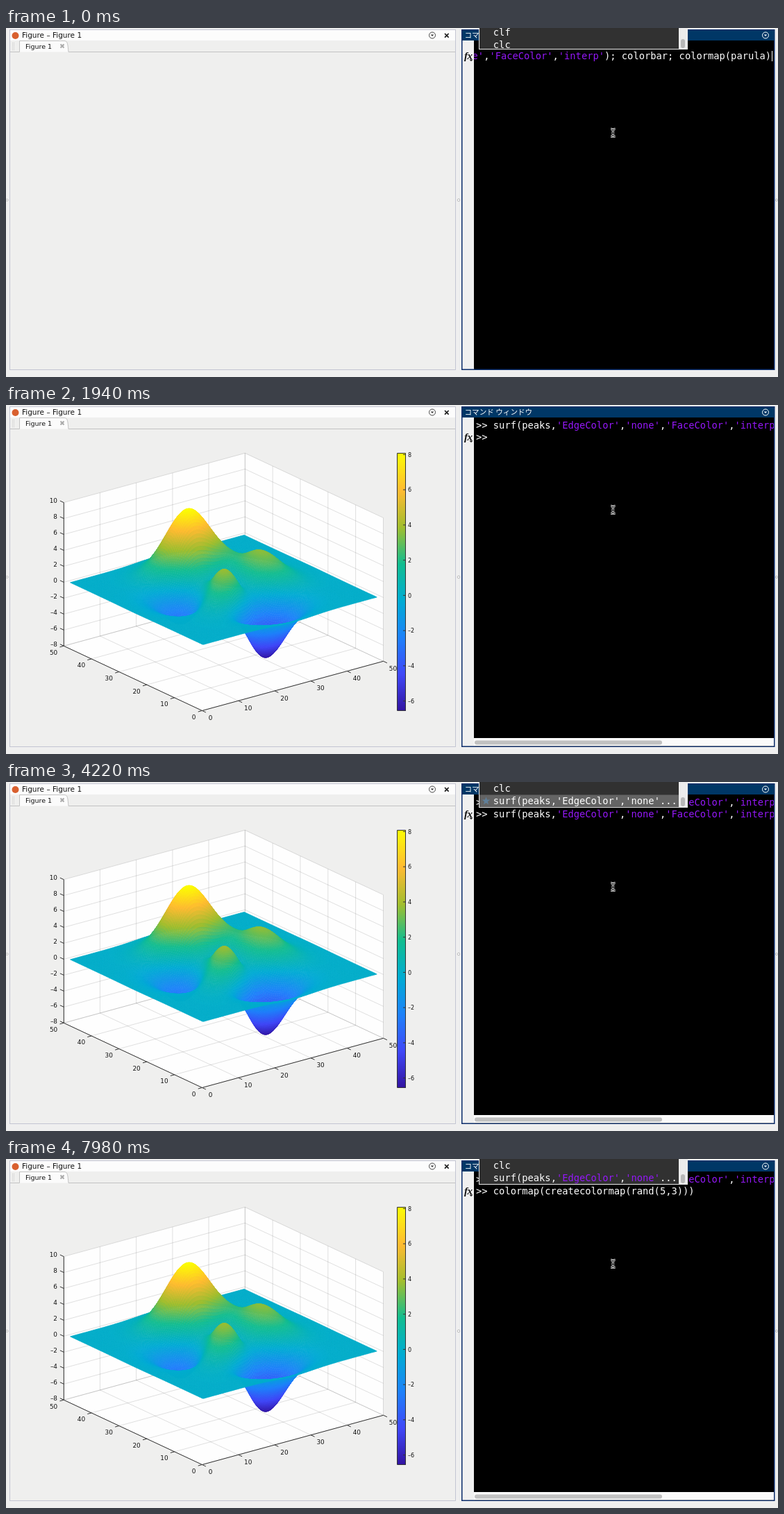
Animation, 1112 px wide and 503 px high, one loop 8000 ms. Source, as an HTML page with a canvas:

```html
<!DOCTYPE html>
<html lang="ja">
<head>
<meta charset="utf-8">
<title>Figure and command window</title>
<style>
  html, body { margin: 0; width: 100%; height: 100%; overflow: hidden; background: #efefef; }
  svg, canvas { position: absolute; left: 0; top: 0; }
  text { white-space: pre; }
  .ui { font-family: "DejaVu Sans", "Noto Sans", sans-serif; fill: #111; }
  .jp { font: 10.6px "Noto Sans CJK JP", "Noto Sans CJK", sans-serif; fill: #fff; }
  .code { font: 13.76px "DejaVu Sans Mono", monospace; fill: #fff; }
  .str { fill: #9418f8; }
  .fx { font: italic bold 15px "Liberation Serif", "Noto Serif", serif; fill: #111; letter-spacing: -.5px; }
  .axis { stroke: #333; fill: none; }
  .grid { stroke: #262626; stroke-opacity: .14; fill: none; }
</style>
</head>
<body>
<svg id="stage" width="1112" height="503" viewBox="0 0 1112 503">
  <defs>
    <clipPath id="pane"><rect x="674" y="18" width="432" height="473"/></clipPath>
    <clipPath id="list"><rect x="682" y="0" width="287" height="36"/></clipPath>
  </defs>

  <!-- figure window -->
  <rect x="5.5" y="2.5" width="642" height="490" fill="#efefee" stroke="#c3c5d2"/>
  <rect x="6" y="3" width="641" height="15" fill="#fcfcfc"/>
  <path d="M6 34.5H19.5V18.5H84C89 18.5 89 24 90 34.5H647" fill="#fbfbfb" stroke="#c2c2c2"/>
  <path d="M9.5 21V32M11.5 21V32" stroke="#c8c8c8" stroke-dasharray="1 1"/>
  <circle cx="13.5" cy="11" r="5" fill="#d9602f"/>
  <text class="ui" x="23" y="14.4" font-size="10.5">Figure – Figure 1</text>
  <text class="ui" x="28" y="30" font-size="9.5">Figure 1</text>
  <path d="M78.5 23.5l5 5m0-5l-5 5" stroke="#aaa" stroke-width="2"/>
  <g stroke="#444" fill="none"><circle cx="614" cy="10.5" r="4.5"/><path d="M611.8 9.5h4.4l-2.2 2.6z" fill="#333" stroke="none"/></g>
  <path d="M632 8l5.6 5.6m0-5.6l-5.6 5.6" stroke="#111" stroke-width="1.6"/>
  <g fill="#fff" stroke="#bbb"><circle cx="1.5" cy="248" r="1.5"/><circle cx="652" cy="248" r="1.8"/><circle cx="1110" cy="248" r="1.5"/></g>

  <!-- command window -->
  <rect x="656" y="2" width="451.5" height="491" fill="#0b2c6b"/>
  <rect x="657" y="3" width="450" height="15" fill="#003766"/>
  <rect x="657.5" y="18" width="17" height="473.5" fill="#f0f0f0"/>
  <rect x="674" y="18" width="432" height="473.5"/>
  <text class="jp" x="660.5" y="13.6">コマンド ウィンドウ</text>
  <g stroke="#fff" fill="none"><circle cx="1094" cy="10.5" r="4.5"/><path d="M1091.8 9.5h4.4l-2.2 2.6z" fill="#fff" stroke="none"/></g>
</svg>
<canvas id="surface" width="1112" height="503"></canvas>

<script>
const LOOP = 8000, ENTER = 1280, PLOT = 1660, POPUP = 3900, CLC = 4560, CLF = 4900, RECALL = 6120;
const CHAR = 8.284, LEFT = 677, INPUT = LEFT + 3 * CHAR;
const SURF = "surf(peaks,'EdgeColor','none','FaceColor','interp'); colorbar; colormap(parula)";
const MAP = 'colormap(createcolormap(rand(5,3)))';
const stage = document.getElementById('stage');
const canvas = document.getElementById('surface');
const timed = [];

function el(tag, attrs, parent = stage, text) {
  const node = document.createElementNS('http://www.w3.org/2000/svg', tag);
  for (const k in attrs) node.setAttribute(k, attrs[k]);
  if (text !== undefined) node.textContent = text;
  return parent.appendChild(node);
}

// Shows a node only during the given [from, to) spans.
function during(node, ...spans) {
  timed.push([node, spans]);
  return node;
}

const group = (...spans) => during(el('g', {}), ...spans);
const rect = (parent, x, y, width, height, fill, rx = 0) =>
  el('rect', { x, y, width, height, fill, rx }, parent);

function code(parent, x, y, str, plain) {
  const text = el('text', { class: 'code', x, y }, parent);
  for (const part of plain ? [str] : str.split(/('[^']*')/))
    el('tspan', !plain && part[0] === "'" ? { class: 'str' } : {}, text, part);
}

function caret(x, y, start, end) {
  const spans = [];
  for (let t = start; t < end; t += 1000) spans.push([t, Math.min(t + 500, end)]);
  during(rect(stage, x, y - 12, 1, 16, '#fff'), ...spans);
}

function fx(parent, y) {
  el('text', { class: 'fx', x: 660, y }, parent, 'fx');
  el('path', { d: `M667.5 ${y + 1}h5l-2.5 2.5z`, fill: '#111' }, parent);
}

/* ---- plot ---- */
const project = (x, y, z) => [282.5 + 5.22 * x - 3.985 * y, 440.5 - 1.425 * x - 1.865 * y - 11.48 * (z + 8)];
const poly = pts => 'M' + pts.map(p => project(...p).map(v => v.toFixed(1)).join(' ')).join('L');

function axes() {
  const g = group([PLOT, LOOP]);
  const line = (cls, ...pts) => el('path', { class: cls, d: poly(pts) }, g);
  const label = (x, y, str, size, anchor = 'middle') =>
    el('text', { class: 'ui', x, y, 'font-size': size, 'text-anchor': anchor }, g, String(str).replace('-', '–'));
  const tick = (p, dx, dy) => el('path', { class: 'axis', d: `M${p}l${dx} ${dy}` }, g);

  el('path', {
    d: poly([[0, 0, -8], [50, 0, -8], [50, 0, 10], [50, 50, 10], [0, 50, 10], [0, 50, -8]]) + 'Z', fill: '#fefefe'
  }, g);
  for (let v = 0; v <= 50; v += 10) {
    line('grid', [v, 0, -8], [v, 50, -8], [v, 50, 10]);
    line('grid', [0, v, -8], [50, v, -8], [50, v, 10]);
    const px = project(v, 0, -8), py = project(0, v, -8);
    tick(px, 5.4, 2.5);
    tick(py, -5.8, 1.6);
    label(px[0] + (v ? 14 : 12), px[1] + 13.5, v, 8.9);
    label(py[0] - (v ? 14.7 : 12), py[1] + 12.3, v, 8.9);
  }
  for (let z = -8; z <= 10; z += 2) {
    line('grid', [0, 50, z], [50, 50, z], [50, 0, z]);
    const p = project(0, 50, z);
    tick(p, -5.4, -2.5);
    label(74, p[1] + .8, z, 8.9, 'end');
  }
  line('axis', [50, 0, -8], [0, 0, -8], [0, 50, -8], [0, 50, 10]);
  for (let v = -6; v <= 8; v += 2) label(579, barY(v) + 3.2, v, 8, 'start');
}

const LOW = -6.547, HIGH = 8.075;
const barY = v => 440.5 - (v - LOW) / (HIGH - LOW) * 371;
const parula = [[50, 20, 160], [64, 72, 248], [30, 130, 250], [0, 172, 211], [18, 189, 144],
  [162, 190, 46], [255, 187, 50], [252, 252, 4]];

function shade(z) {
  const t = Math.max(0, Math.min(.9999, (z - LOW) / (HIGH - LOW))) * (parula.length - 1);
  const i = Math.floor(t), f = t - i;
  return `rgb(${parula[i].map((c, k) => Math.round(c + (parula[i + 1][k] - c) * f))})`;
}

function peaks(x, y) {
  const { exp } = Math;
  return 3 * (1 - x) ** 2 * exp(-x * x - (y + 1) ** 2)
    - 10 * (x / 5 - x ** 3 - y ** 5) * exp(-x * x - y * y)
    - exp(-((x + 1) ** 2) - y * y) / 3;
}

function drawSurface() {
  const ctx = canvas.getContext('2d'), N = 144;
  const height = (i, j) => peaks(i * 6 / N - 3, j * 6 / N - 3);
  const at = (i, j) => project(1 + i * 48 / N, 1 + j * 48 / N, height(i, j));
  ctx.lineWidth = .6;
  ctx.lineJoin = 'round';
  for (let j = N - 1; j >= 0; j--)
    for (let i = N - 1; i >= 0; i--) {
      ctx.fillStyle = ctx.strokeStyle = shade(height(i + .5, j + .5));
      ctx.beginPath();
      ctx.moveTo(...at(i, j));
      ctx.lineTo(...at(i + 1, j));
      ctx.lineTo(...at(i + 1, j + 1));
      ctx.lineTo(...at(i, j + 1));
      ctx.closePath();
      ctx.fill();
      ctx.stroke();
    }
  for (let y = 69; y < 441; y++) {
    ctx.fillStyle = shade(LOW + (440.5 - y) / 371 * (HIGH - LOW));
    ctx.fillRect(564, y, 12, 1);
  }
  ctx.lineWidth = 1;
  ctx.strokeStyle = '#333';
  ctx.strokeRect(563.5, 69.5, 12, 371);
  for (let v = -6; v <= 8; v += 2) {
    ctx.beginPath();
    ctx.moveTo(572, barY(v));
    ctx.lineTo(575.5, barY(v));
    ctx.stroke();
  }
}

/* ---- console ---- */
function popup(g, bottom) {
  rect(g, 681, -2, 301, bottom + 2, '#ececec');
  rect(g, 682, -2, 287, bottom + 1, '#313131');
  rect(g, 972, bottom - 15, 6, 13, '#b8b8b8', 3);
}

function selected(y, str, ...span) {
  const g = during(el('g', { 'clip-path': 'url(#list)' }), span);
  rect(g, 682, y - 13, 287, 17, '#646464');
  let star = '';
  for (let k = 0; k < 10; k++) {
    const r = k % 2 ? 2.5 : 6, a = k * Math.PI / 5;
    star += `${(691.5 + r * Math.sin(a)).toFixed(1)},${(y - 4 - r * Math.cos(a)).toFixed(1)} `;
  }
  el('polygon', { points: star, fill: '#5f7f99' }, g);
  code(g, INPUT, y, str, true);
}

function consoleView() {
  const paneLine = (y, str, ...span) => {
    const g = during(el('g', { 'clip-path': 'url(#pane)' }), span);
    code(g, LEFT, y, '>> ' + str);
  };

  const first = group([0, ENTER]);
  fx(first, 44.5);
  code(el('g', { 'clip-path': 'url(#pane)' }, first), 1102.5 - SURF.length * CHAR, 44.5, SURF);
  popup(first, 31);
  code(first, INPUT, 11, 'clf');
  code(first, INPUT, 29, 'clc');
  during(rect(stage, 1103, 33, 1, 15, '#fff'), [0, 300], [800, ENTER]);

  const later = group([ENTER, LOOP]);
  fx(later, 50.5);
  rect(later, 674, 480, 432, 11.5, '#fafafa');
  rect(later, 675, 483.5, 270, 6, '#c1c1c1', 3);
  paneLine(34, SURF, ENTER, LOOP);
  paneLine(50.5, '', ENTER, POPUP);
  paneLine(50.5, SURF, POPUP, CLC);
  paneLine(50.5, 'clc', CLC, CLF);
  paneLine(50.5, 'clf', CLF, RECALL);
  paneLine(50.5, MAP, RECALL, LOOP);

  const list = group([POPUP, LOOP]);
  popup(list, 37);
  code(list, INPUT, 13.5, 'clc');
  code(list, INPUT, 31.5, SURF.slice(0, 29) + '...');
  selected(31.5, SURF.slice(0, 29) + '...', POPUP, CLC);
  selected(13.5, 'clc', CLC, CLF);

  caret(702, 50.5, ENTER, POPUP);
  caret(727, 50.5, CLC, CLF);
  caret(727, 50.5, CLF, RECALL);
  caret(992, 50.5, RECALL, LOOP);
}

function pointer() {
  const d = 'M871 145.5q3 0 3.3 2q.3-2 3.3-2M874.3 147.5v7M871 156.5q3 0 3.3-2q.3 2 3.3 2M872.5 151.5h3.6';
  el('path', { d, fill: 'none', stroke: '#e8e8e8', 'stroke-width': 3 });
  el('path', { d, fill: 'none', stroke: '#000', 'stroke-width': 1 });
}

axes();
drawSurface();
during(canvas, [PLOT, LOOP]);
consoleView();
pointer();

const start = performance.now();
function frame() {
  const t = (performance.now() - start) % LOOP;
  for (const [node, spans] of timed)
    node.style.display = spans.some(([a, b]) => t >= a && t < b) ? '' : 'none';
  requestAnimationFrame(frame);
}
frame();
</script>
</body>
</html>
```
